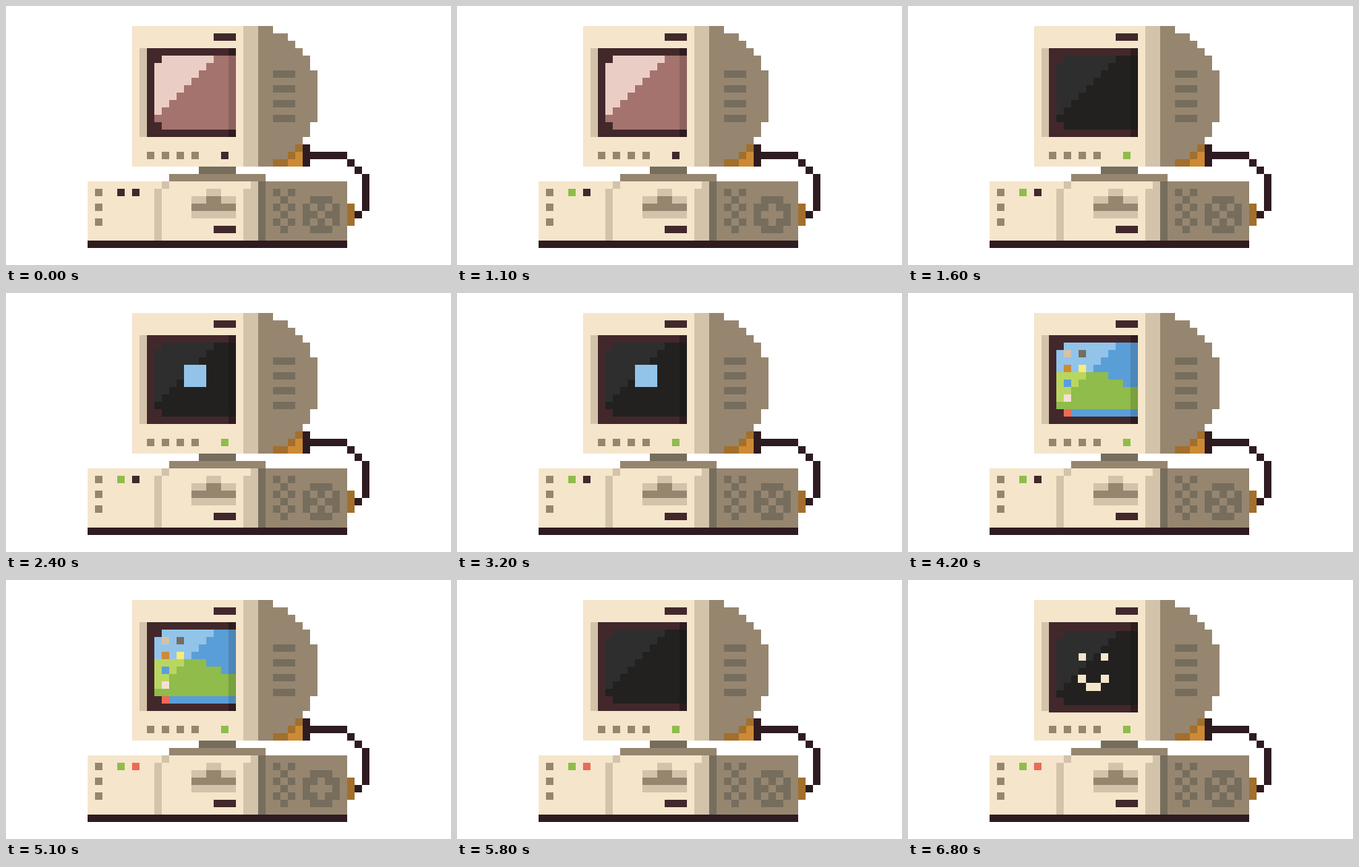
These frames come from a looping animation (600x350 px, 6.9 s). An HTML page with a canvas:

```html
<!DOCTYPE html>
<html lang="en">
<head>
<meta charset="utf-8">
<style>
html, body { margin: 0; width: 600px; height: 350px; overflow: hidden; background: #fff; }
canvas { display: block; }
</style>
</head>
<body>
<canvas id="stage" width="600" height="350"></canvas>
<script>
const ctx = document.getElementById('stage').getContext('2d');
const LOOP = 6900, STEP = 100;
const CREAM = '#f5e5cb', SHADE = '#d2c3aa', SIDE = '#968670', VENT = '#766d5d',
  DARK = '#2f1c20', BEZEL = '#42282b', BROWN = '#a26f2c', ORANGE = '#cc8a35',
  GREEN = '#8fbc4b', RED = '#eb6a56', BLUE = '#5a9ed8', SKY = '#92c4ea',
  LIME = '#b9d660', YELLOW = '#f8ec78', PINK = '#f3e0d3';

// All positions are in cells of 10 px; the grid starts at y = 7.
function cell(color, x, y, w = 1, h = 1) {
  ctx.fillStyle = color;
  ctx.fillRect(...[x * 10, y * 10 + 7, w * 10, h * 10].map(Math.round));
}

function row(color, count, x, y, gap = 2) {
  for (let i = 0; i < count; i++) cell(color, x + i * gap, y);
}

function column(color, count, x, y, w = 1) {
  for (let i = 0; i < count; i++) cell(color, x, y + i * 2, w);
}

// Walks cell by cell through straight and diagonal legs.
function trail(color, [x, y], ...stops) {
  cell(color, x, y);
  for (const [endX, endY] of stops) {
    while (x !== endX || y !== endY) {
      x += Math.sign(endX - x);
      y += Math.sign(endY - y);
      cell(color, x, y);
    }
  }
}

function drawMonitor(on) {
  for (let d = -9; d <= 9; d++)
    cell(SIDE, 34, 11 + d, 8 - Math.round(Math.abs(d) ** 3 / 120));
  cell(CREAM, 17, 2, 15, 19);
  cell(SHADE, 32, 2, 2, 19);
  cell(SHADE, 18, 5, 1, 12);
  cell(BEZEL, 28, 3, 3);
  column(VENT, 4, 36, 8, 3);
  row(SIDE, 4, 19, 19);
  cell(on ? GREEN : BEZEL, 29, 19);
}

function drawCable() {
  for (let r = 0; r < 3; r++) {
    const x = 39 - r * (r + 1) / 2;
    cell(ORANGE, x, 18 + r, 40 - x);
    cell(BROWN, x, 18 + r, Math.max(1, r));
  }
  cell(BROWN, 46, 26, 1, 3);
  cell(DARK, 40, 18, 1, 3);
  trail(DARK, [41, 19], [45, 19], [48, 22], [48, 26], [47, 27]);
}

function drawFan(turned) {
  for (let y = -2; y <= 2; y++) {
    for (let x = -2; x <= 2; x++) {
      const inner = Math.max(Math.abs(x), Math.abs(y)) < 2;
      const hub = !x && !y;
      const blade = inner && (hub || (x + y) % 2 !== 0 === turned);
      if (x * x + y * y <= 5) cell(blade ? SIDE : VENT, 42 + x, 27 + y);
    }
  }
}

function drawDrive() {
  cell(SHADE, 27, 24, 2);
  cell(SHADE, 25, 25, 6, 3);
  cell(SIDE, 27, 25, 2);
  cell(SIDE, 25, 26, 6);
  cell(BEZEL, 28, 29, 3);
}

function drawCase(power, busy, turned) {
  cell(VENT, 26, 21, 5);
  cell(SIDE, 22, 22, 13);
  cell(CREAM, 11, 23, 23, 8);
  cell(SHADE, 20, 24, 1, 7);
  cell(SHADE, 32, 24, 2, 7);
  row(SHADE, 2, 21, 23, 12);
  cell(VENT, 34, 23, 1, 8);
  cell(SIDE, 35, 23, 11, 8);
  cell(DARK, 11, 31, 35);
  column(SIDE, 3, 12, 24);
  cell(power ? GREEN : BEZEL, 15, 24);
  cell(busy ? RED : BEZEL, 17, 24);
  drawDrive();
  column(VENT, 3, 36, 24);
  column(VENT, 3, 37, 25);
  column(VENT, 3, 38, 24);
  drawFan(turned);
}

// Glass with a diagonal reflection in the upper left.
function drawGlass(base, shine) {
  cell(base, 20, 6, 11, 10);
  for (let r = 0; r < 8; r++) cell(shine, 20, 6 + r, 8 - r);
}

function drawDesktop() {
  drawGlass(BLUE, SKY);
  for (let r = 0; r < 5; r++) {
    cell(GREEN, 20, 10 + r, Math.min(11, 7 + 2 * r));
    cell(LIME, 20, 10 + r, Math.max(0, 4 - r));
  }
  [SHADE, ORANGE, BLUE, PINK, RED].forEach((color, i) => cell(color, 21, 7 + 2 * i));
  [VENT, YELLOW].forEach((color, i) => cell(color, 23, 7 + 2 * i));
}

function drawFace(grow) {
  row(CREAM, 2, 23, 9, 3);
  cell(CREAM, 23 - grow, 12 - grow, 1 + grow, 1 + grow);
  cell(CREAM, 26, 12 - grow, 1 + grow, 1 + grow);
  cell(CREAM, 24, 13, 2, 1 + grow);
}

function drawScreen(mode, shift) {
  cell(BEZEL, 19, 5, 12, 12);
  cell(DARK, 30, 5);
  ctx.save();
  ctx.translate(0, shift);
  cell(BEZEL, 19, 5.2, 11, 11.8);
  cell(DARK, 30, 5, 1, 12);
  if (mode === 'off') drawGlass('#a5736e', '#eacec6');
  else if (mode === 'desktop') drawDesktop();
  else drawGlass('#222120', '#2e2e2e');
  cell(BEZEL, 20, 6);
  cell(BEZEL, 20, 15);
  if (mode === 'boot') cell(SKY, 24, 9, 3, 3);
  if (mode === 'face') drawFace(Math.max(0, shift - 1) / 10);
  cell('rgba(0, 0, 0, 0.15)', 30, 6, 1, 10);
  ctx.restore();
}

function screenAt(t) {
  if (t < 1300) return 'off';
  if (t < 2000) return 'blank';
  if (t < 3500) return 'boot';
  if (t < 5500) return 'desktop';
  return t < 6100 ? 'blank' : 'face';
}

// The face sways gently between 1 px up and 2 px down.
const sway = t => Math.round(0.5 - 1.5 * Math.cos((t - 6300) / 1000 * 2 * Math.PI));

function draw() {
  const t = Math.floor((performance.now() - start) % LOOP / STEP) * STEP;
  const power = t >= 1000;
  const odd = power && t / STEP % 2 === 1;
  const busy = t >= 5100 || t >= 1700 && odd;
  const mode = screenAt(t);

  ctx.fillStyle = '#fff';
  ctx.fillRect(0, 0, 600, 350);
  drawMonitor(mode !== 'off');
  drawCase(power, busy, odd);
  drawCable();
  drawScreen(mode, mode === 'face' ? sway(t) : 0);
  requestAnimationFrame(draw);
}

const start = performance.now();
draw();
</script>
</body>
</html>
```
